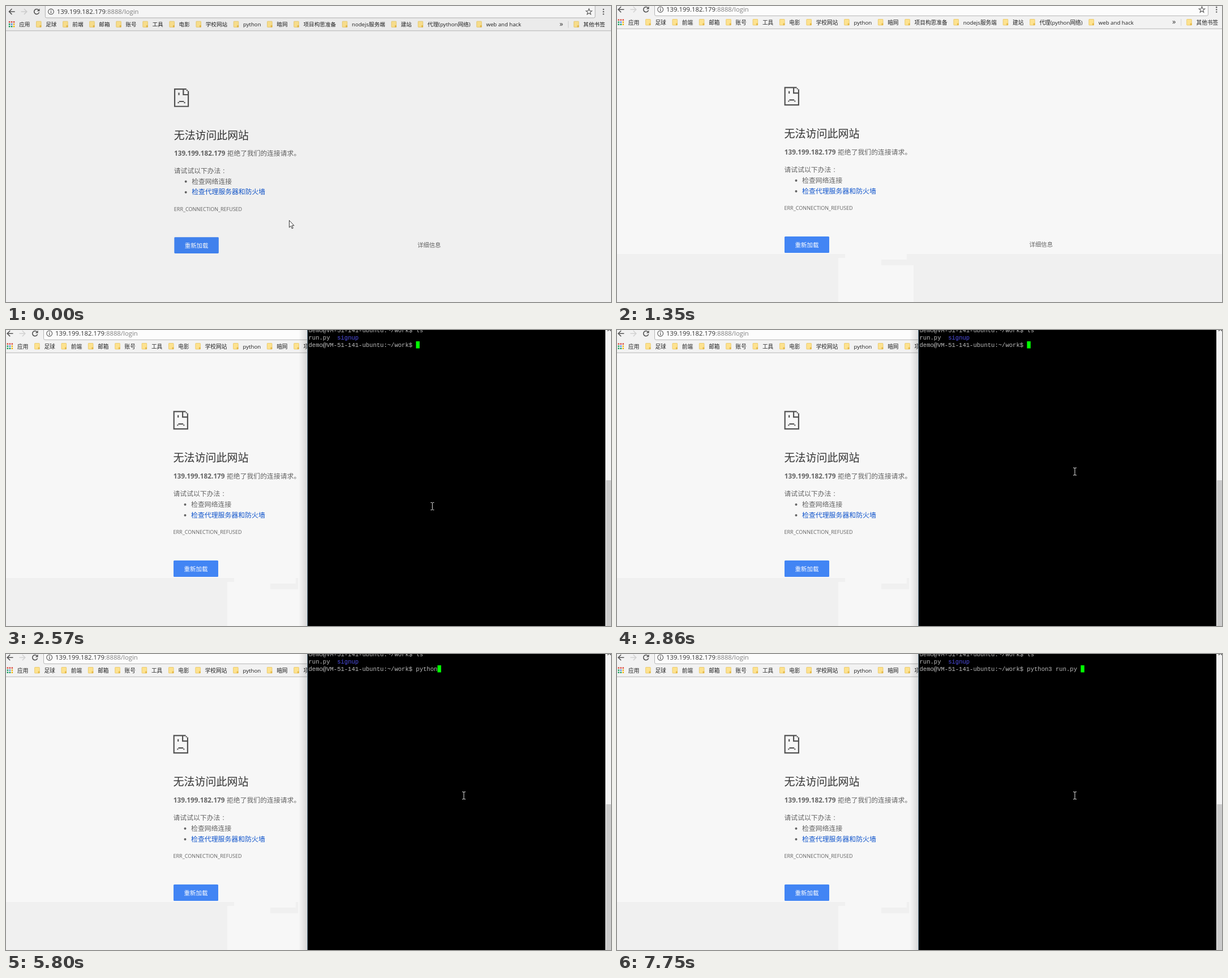
An HTML page that plays this animation: 1069x524 px, repeating every 8000 ms.

```html
<!DOCTYPE html>
<html lang="zh">
<head>
<meta charset="utf-8">
<title>Connection refused</title>
<style>
  html, body { margin: 0; width: 100%; height: 100%; overflow: hidden; background: #f7f7f7; }
  svg { display: block; width: 100%; height: 100%; }
  text { font-family: "Open Sans", "Noto Sans CJK SC", "Noto Sans CJK", sans-serif; white-space: pre; }
  .mono { font-family: "Liberation Mono", monospace; font-size: 10.55px; fill: #bbb; }
</style>
</head>
<body>
<svg id="stage" viewBox="0 0 1069 524">
  <defs>
    <linearGradient id="shadeL"><stop offset="0" stop-opacity="0"/><stop offset="1" stop-opacity=".13"/></linearGradient>
    <linearGradient id="shadeR"><stop offset="0" stop-opacity=".13"/><stop offset="1" stop-opacity="0"/></linearGradient>
    <clipPath id="right"><rect x="516" width="553" height="524"/></clipPath>
    <clipPath id="strip"><rect y="439" width="1069" height="85"/></clipPath>
  </defs>
  <rect width="1069" height="524" fill="#f7f7f7"/>
  <g id="page"></g>
  <rect id="veil" width="1069" height="439"/>
  <g id="lower" clip-path="url(#strip)"></g>
  <g id="overlay" clip-path="url(#right)"><rect x="516" y="439" width="553" height="85" fill="#f7f7f7"/><g id="term"></g></g>
  <path id="arrow" d="M.5 .5V13L3.4 10.3 5.3 15 7.2 14.2 5.3 9.7H9z" fill="#fff" stroke="#222" stroke-width=".9"/>
  <path id="beam" d="M-3 -6.5H-1L0 -5.8 1 -6.5H3M0 -5.8V5.8M-3 6.5H-1L0 5.8 1 6.5H3" fill="none" stroke="#e4e4e4"/>
</svg>
<script>
const $ = id => document.getElementById(id);
const LOOP = 8000;

const rect = (x, y, w, h, fill, extra = '') =>
  `<rect x="${x}" y="${y}" width="${w}" height="${h}" fill="${fill}" ${extra}/>`;
const line = (d, color, width = 1, extra = '') =>
  `<path d="${d}" fill="none" stroke="${color}" stroke-width="${width}" ${extra}/>`;
const label = (x, y, size, fill, str, extra = '') =>
  `<text x="${x}" y="${y}" font-size="${size}" fill="${fill}" ${extra}>${str}</text>`;
const mono = (x, y, str, extra = '') => `<text class="mono" x="${x}" y="${y}" ${extra}>${str}</text>`;
const dot = (x, y, r, fill) => `<circle cx="${x}" cy="${y}" r="${r}" fill="${fill}"/>`;

// Browser window

const BOOKMARKS = ['足球', '前端', '邮箱', '账号', '工具', '电影', '学校网站', 'python', '暗网',
  '项目构思准备', 'nodejs服务端', '建站', '代理(python网络)', 'web and hack'];

const folder = x =>
  rect(x + .5, 23.5, 8.6, 10.4, '#fde28f', 'stroke="#e9c660" stroke-width=".8" rx=".6"') +
  rect(x + 6.6, 30.6, 2.8, 3.4, '#e5b94a');
const bookmark = (x, str) => folder(x - 17.3) + label(x, 32.6, 9.7, '#222', str);

function star(cx, cy, r) {
  const pts = Array.from({ length: 10 }, (_, i) => {
    const a = Math.PI * (i / 5 - .5), d = i % 2 ? r * .42 : r;
    return `${cx + d * Math.cos(a)} ${cy + d * Math.sin(a)}`;
  });
  return line(`M${pts.join('L')}Z`, '#5a5a5a', 1.1);
}

function appGrid() {
  const red = '#db4437', green = '#0f9d58', blue = '#4285f4', yellow = '#f4b400';
  return [red, red, red, green, blue, yellow, green, green, yellow]
    .map((c, i) => rect(1.6 + i % 3 * 4, 23.4 + Math.floor(i / 3) * 4, 2.5, 2.5, c)).join('');
}

function toolbar() {
  return rect(-10, -10, 1100, 50, '#f2f2f2') + rect(-10, 39.8, 1100, 1, '#b9b9b9') +
    rect(66.5, -10, 978, 27.3, '#fcfcfc', 'rx="2.5" stroke="#b4b4b4"') +
    line('M12.5 6.2H2.4M7.2 1.2L2.2 6.2L7.2 11.2', '#555', 1.6) +
    line('M23.5 6.2H33.6M28.8 1.2L33.8 6.2L28.8 11.2', '#d2d2d2', 1.6) +
    `<g id="reload">${line('M54.6 3.2A4.5 4.5 0 1 0 55.6 7.4', '#555', 1.6)}<path d="M56.6 .8V5.6H51.8Z" fill="#555"/></g>` +
    line('M47 2L56 11M56 2L47 11', '#555', 1.5, 'id="stop"') +
    '<circle cx="76.7" cy="6.2" r="4.9" fill="none" stroke="#555" stroke-width="1.1"/>' +
    line('M76.7 3.2v1.4m0 .8v3.6', '#555', 1.3) +
    label(87, 10.3, 11.35, '#333', '139.199.182.179<tspan fill="#808080">:8888/login</tspan>') +
    star(1033.5, 6.6, 5.6) +
    [0, 1, 2].map(i => dot(1059.3, 2.2 + 4.2 * i, 1.2, '#555')).join('') +
    appGrid() + label(20, 32.6, 9.7, '#222', '应用') +
    label(981, 32.4, 13, '#333', '»') + rect(996.3, 23, .9, 12, '#cfcfcf') + bookmark(1023.5, '其他书签');
}

// Each bookmark starts a fixed gap after the end of the one before
function addBookmarks() {
  let x = 67.4;
  for (const name of BOOKMARKS) {
    $('page').insertAdjacentHTML('beforeend', bookmark(x, name));
    x += $('page').lastElementChild.getComputedTextLength() + 28;
  }
}

const sadFile = () => line(
  'M10 .5H.5V14.5H11.5V2M10 1.5h1M7.5 .5V5H11.5M3.9 3.4v2M3 11.5h1M4 10.5h4M8 11.5h1',
  '#535353', 1, 'transform="translate(295.6 143.2) scale(2.2)"');

function errorPage() {
  const grey = '#646464';
  return sadFile() +
    label(295.5, 233.4, 19, '#333', '无法访问此网站') +
    label(295.7, 262.8, 11.8, grey, '139.199.182.179', 'font-weight="700"') +
    label(390, 262.8, 11.85, grey, '拒绝了我们的连接请求。') +
    label(295.5, 293.8, 11.85, grey, '请试试以下办法<tspan dx="4">:</tspan>') +
    dot(316.5, 309, 2, grey) + label(327, 312.8, 11.9, grey, '检查网络连接') +
    dot(316.5, 328, 2, grey) + label(327, 331.8, 11.9, '#1155cc', '检查代理服务器和防火墙') +
    label(295.5, 361.4, 9.05, grey, 'ERR_CONNECTION_REFUSED') +
    rect(296, 408, 79, 29, '#4285f4', 'rx="1.5"') +
    label(314.5, 426.8, 10.5, '#fff', '重新加载', 'font-weight="500"') +
    label(728.5, 426.4, 10.4, grey, '详细信息');
}

// Pointer: one key point per beat; every move repaints the box it crosses
const BEAT = 140, POINTER_START = 360;
const pointer = [[500, 379], [503, 360], [403, 433], [458, 452], [425, 446], [391, 459], [515, 524]];

function repaint([x0, y0], [x1, y1], id) {
  const x = Math.min(x0, x1), y = Math.min(y0, y1);
  return rect(x, y, Math.abs(x1 - x0) + 9, Math.abs(y1 - y0) + 16, '#f7f7f7', `id="${id}"`);
}
const lowerStrip = () => rect(0, 439, 1069, 85, '#f0f0f0') +
  pointer.slice(1).map((p, i) => repaint(pointer[i], p, 'trail' + (i + 1))).join('');

// Terminal window

const CH = 10.55 * .6001, LEFT = 534.5;
const PROMPT = 'demo@VM-51-141-ubuntu:~/work$ ';
const OPEN = 2440, OPEN_STEP = 130;

function terminal() {
  return rect(517, -30, 15.5, 620, 'url(#shadeL)') + rect(1075, -30, 15, 620, 'url(#shadeR)') +
    rect(532, -30, 543.5, 620, '#7d98ab') + rect(533, -30, 541.5, 23.5, '#fff') +
    rect(540, -16, 8, 2.4, '#555') + rect(684, -16, 1.4, 2, '#555') +
    rect(533, -6.5, 526, 600, '#000') +
    rect(1059, -6.5, 15.5, 600, '#f3f3f3') + rect(1060, 266, 14, 330, '#cbcbcb') +
    line('M1063 1.8L1066 -1.2L1069 1.8', '#555', 1.5) +
    mono(LEFT, 4.2, PROMPT + 'ls') + mono(LEFT, 16.9, 'run.py') +
    mono(LEFT + 8 * CH, 16.9, 'signup', 'style="fill:#5050e8"') +
    mono(LEFT, 29.5, '', 'id="input"') + rect(0, 20, 6.4, 12.5, '#00ff00', 'id="caret"');
}

// Bursts of keys at an even pace; the file name is completed at once
const KEY = 145, COMPLETE = 7750;
const bursts = [[4850, 'p'], [5220, 'ython'], [6460, '3'], [6760, ' '], [7480, 'r']];

function typed(t) {
  const keys = bursts.map(([start, str]) => str.slice(0, Math.max(0, Math.floor((t - start) / KEY) + 1)));
  return keys.join('') + (t >= COMPLETE ? 'un.py ' : '');
}

// Animation

const show = (id, on) => $(id).setAttribute('visibility', on ? 'visible' : 'hidden');
const move = (id, x, y, s = 1) => $(id).setAttribute('transform', `translate(${x} ${y}) scale(${s})`);

function drawPage(t) {
  const rest = (1 - Math.min(3, Math.floor(t / 120)) / 3) ** 2;
  move('page', 3.28 * rest, 3.8 * rest, 1 - .0065 * rest);
  $('veil').setAttribute('opacity', .028 * rest);

  const loading = t >= bursts[0][0] && t < 5680;
  show('reload', !loading);
  show('stop', loading);
}

function drawPointer(t) {
  const beat = Math.max(0, Math.floor((t - POINTER_START) / BEAT));
  for (let i = 1; i < pointer.length; i++) show('trail' + i, beat >= i);
  show('arrow', beat < pointer.length);
  if (beat < pointer.length) move('arrow', ...pointer[beat]);
}

function drawTerminal(t) {
  const open = t >= OPEN;
  $('overlay').style.display = open ? '' : 'none';
  show('beam', open);
  if (!open) return;

  const step = Math.floor((t - OPEN) / OPEN_STEP);
  const grow = step ? 0 : 1;
  move('term', 8.8 * grow, 14.4 * grow, 1 - .023 * grow);
  $('term').setAttribute('opacity', 1 - .1 * grow);

  const glide = Math.min(1, step * .47);
  move('beam', 704 + 105 * glide, 366.5 - 116 * glide);

  const input = PROMPT + typed(t);
  $('input').textContent = input;
  $('caret').setAttribute('x', LEFT + input.length * CH);
}

$('page').innerHTML = errorPage() + toolbar();
addBookmarks();
$('lower').innerHTML = lowerStrip();
$('term').innerHTML = terminal();

const start = performance.now();
function tick() {
  const t = (performance.now() - start) % LOOP;
  drawPage(t);
  drawPointer(t);
  drawTerminal(t);
  requestAnimationFrame(tick);
}
tick();
</script>
</body>
</html>
```
